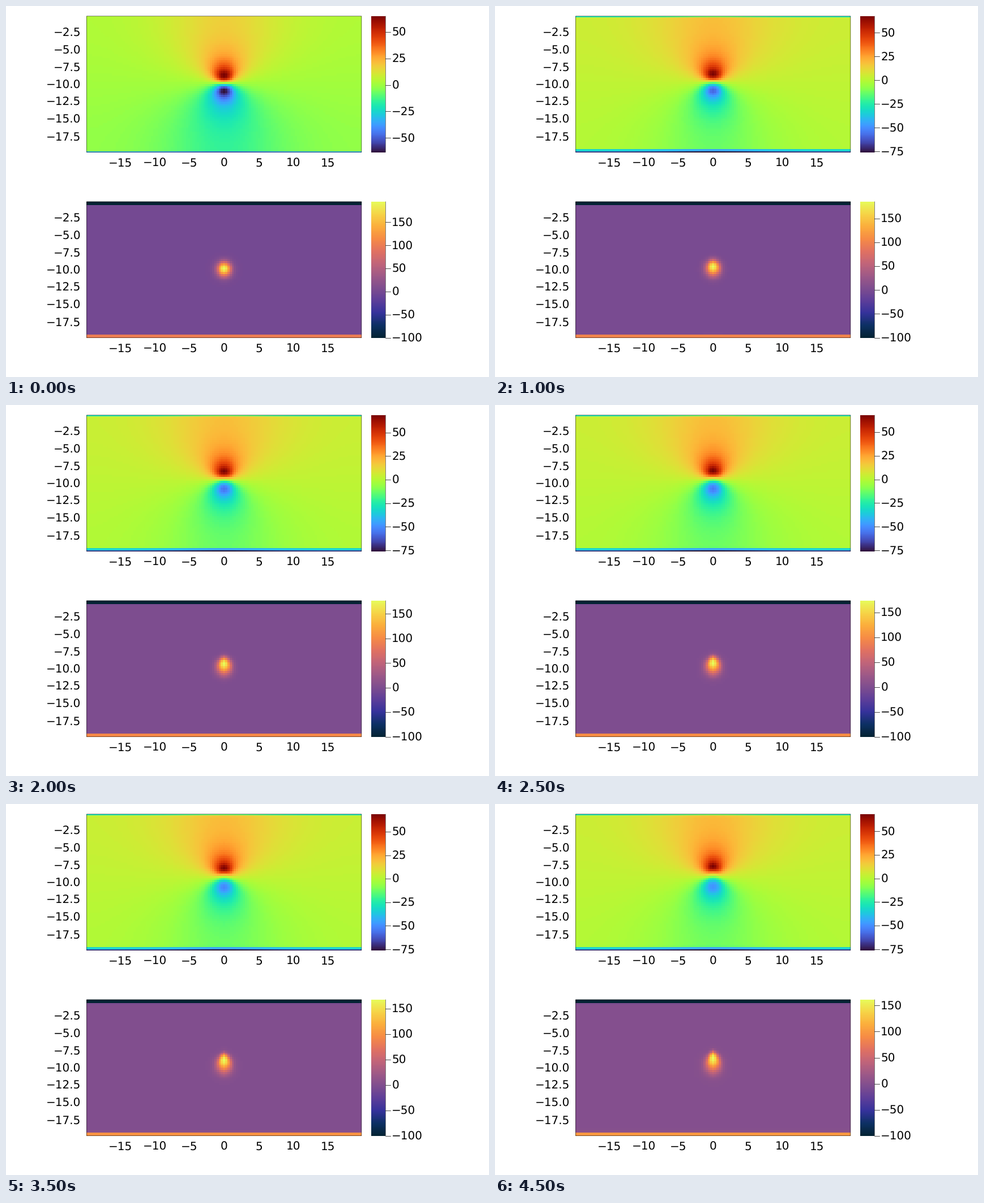
Animation, 853 px wide and 656 px high, one loop 5000 ms. Source, as a matplotlib script:

```python
import numpy as np
import matplotlib.pyplot as plt
from matplotlib.animation import FuncAnimation
from matplotlib.colors import LinearSegmentedColormap
from matplotlib.patches import Rectangle

W, H, DPI = 853, 656, 128
PX = 72 / DPI                      # points per pixel
STEPS, INTERVAL = 10, 500
plt.rcParams["text.hinting"] = "none"

# Porous convection of a warm blob between a hot floor and a cold ceiling
LX, LY = 40.0, 20.0
NX, NY = 127, 64
DX, DY = LX / NX, LY / NY
DELTA, PHI, DIFFUSIVITY = 200.0, 0.1, 4.0


def cosine_basis(n):
    k = np.arange(n)
    basis = np.cos(np.pi * np.outer(k, k + 0.5) / n) * np.sqrt(2 / n)
    basis[0] /= np.sqrt(2)
    return basis


CX, CY = cosine_basis(NX), cosine_basis(NY)
EIGEN = -((2 * np.sin(np.pi * np.arange(NX) / (2 * NX)) / DX) ** 2)[:, None] \
        - ((2 * np.sin(np.pi * np.arange(NY) / (2 * NY)) / DY) ** 2)[None, :]
EIGEN[0, 0] = 1.0


def solve_pressure(rhs):
    coef = CX @ rhs @ CY.T / EIGEN
    coef[0, 0] = 0.0
    return CX.T @ coef @ CY


def start_temperature():
    x = (np.arange(NX) + 0.5) * DX - LX / 2
    y = (np.arange(NY) + 0.5) * DY - LY
    t = DELTA * np.exp(-x[:, None] ** 2 - (y[None, :] + LY / 2) ** 2)
    t[:, 0], t[:, -1] = DELTA / 2, -DELTA / 2
    return t


def advance(t):
    """Return the pressure for t and the temperature one step later."""
    qy = np.zeros((NX, NY + 1))
    qy[:, 1:-1] = t[:, :-1]
    p = solve_pressure(np.diff(qy, axis=1) / DY)
    qy[:, 1:-1] -= np.diff(p, axis=1) / DY
    qx = np.zeros((NX + 1, NY))
    qx[1:-1] = -np.diff(p, axis=0) / DX
    dt = PHI * min(DX / abs(qx).max(), DY / abs(qy).max()) / 2.1

    gx, gy = np.diff(t, axis=0) / DX, np.diff(t, axis=1) / DY
    lap = np.diff(gx, axis=0)[:, 1:-1] / DX + np.diff(gy, axis=1)[1:-1] / DY
    upwind = (np.maximum(qx[1:-2, 1:-1], 0) * gx[:-1, 1:-1]
              + np.minimum(qx[2:-1, 1:-1], 0) * gx[1:, 1:-1]
              + np.maximum(qy[1:-1, 1:-2], 0) * gy[1:-1, :-1]
              + np.minimum(qy[1:-1, 2:-1], 0) * gy[1:-1, 1:])
    new = t.copy()
    new[1:-1, 1:-1] += dt * (DIFFUSIVITY * lap - upwind / PHI)
    new[[0, -1]] = new[[1, -2]]
    new[:, :2], new[:, -2:] = DELTA / 2, -DELTA / 2
    return p, new


def simulate():
    t, history = start_temperature(), []
    for _ in range(STEPS):
        p, t = advance(t)
        history.append((p, t))
    return history


THERMAL = LinearSegmentedColormap.from_list("thermal", [
    "#032333", "#0d3064", "#35329b", "#5d3e99", "#7e4d8f", "#9e5987",
    "#c16479", "#e17161", "#f68b45", "#fbad3c", "#f6d346", "#e7fa5a"])

fig = plt.figure(figsize=(W / DPI, H / DPI), dpi=DPI, facecolor="white")
ax = fig.add_axes([0, 0, 1, 1])
ax.axis("off")

LEFT, RIGHT = 142.4, 627.9
BAR_L, BAR_R, TICK_R, LABEL_X = 644.6, 670.5, 679, 681.2
FONT = dict(family="DejaVu Sans", size=20 * PX, color="black", va="baseline")
THIN = dict(color="black", lw=0.5 * PX, snap=False)


def label(v, digits=None):
    s = f"{v:g}" if digits is None else f"{v:.{digits}f}"
    return s.replace("-", "\u2212")


class Panel:
    def __init__(self, top, bottom, cmap, spacing):
        self.top, self.bottom, self.spacing = top, bottom, spacing
        hw = (RIGHT - LEFT) / (NX - 1) / 2
        hh = (bottom - top) / (NY - 1) / 2
        box = Rectangle((LEFT, top), RIGHT - LEFT, bottom - top,
                        fill=False, zorder=3, **THIN)
        ax.add_patch(box)
        self.mesh = ax.pcolormesh(
            np.linspace(LEFT - hw, RIGHT + hw, NX + 1),
            np.linspace(bottom + hh, top - hh, NY + 1),
            np.zeros((NY, NX)), cmap=cmap)
        self.mesh.set_clip_path(box)
        ax.pcolormesh([BAR_L, BAR_R], np.linspace(bottom, top, 257),
                      np.linspace(0, 1, 256)[:, None], cmap=cmap)
        ax.plot([BAR_R, BAR_R], [top, bottom], **THIN)
        self.ticks = [ax.plot([], [], color="black", lw=0.7 * PX)[0]
                      for _ in range(7)]
        self.names = [ax.text(LABEL_X, top, "", ha="left", **FONT)
                      for _ in range(7)]
        self.draw_axis_labels()

    def draw_axis_labels(self):
        cx, sx = (LEFT + RIGHT) / 2, (RIGHT - LEFT) / (LX - DX)
        for v in range(-15, 16, 5):
            ax.text(cx + v * sx, self.bottom + 24.8, label(v),
                    ha="center", **FONT)
        cy, sy = (self.top + self.bottom) / 2, (self.bottom - self.top) / (LY - DY)
        for v in np.arange(-17.5, 0, 2.5):
            ax.text(132.6, cy - (v + LY / 2) * sy + 7.3, label(v, 1),
                    ha="right", **FONT)

    def show(self, field):
        lo, hi = field.min(), field.max()
        self.mesh.set_array(field.T)
        self.mesh.set_clim(lo, hi)
        first = np.ceil(lo / self.spacing - 1e-6)
        for i, (tick, name) in enumerate(zip(self.ticks, self.names)):
            v = (first + i) * self.spacing
            inside = v <= hi
            tick.set_visible(inside)
            name.set_visible(inside)
            if inside:
                y = self.bottom - (v - lo) / (hi - lo) * (self.bottom - self.top)
                tick.set_data([BAR_R, TICK_R], [y, y])
                name.set_text(label(int(v)))
                name.set_y(y + 7)


pressure = Panel(17.9, 258.6, "turbo", 25)
temperature = Panel(345.9, 586.6, THERMAL, 50)
ax.set_xlim(0, W)
ax.set_ylim(H, 0)

HISTORY = simulate()


def draw(i):
    p, t = HISTORY[i]
    pressure.show(p)
    temperature.show(t)
    return []


anim = FuncAnimation(fig, draw, frames=STEPS, interval=INTERVAL,
                     repeat=True, repeat_delay=0, blit=False)
plt.show()
```
